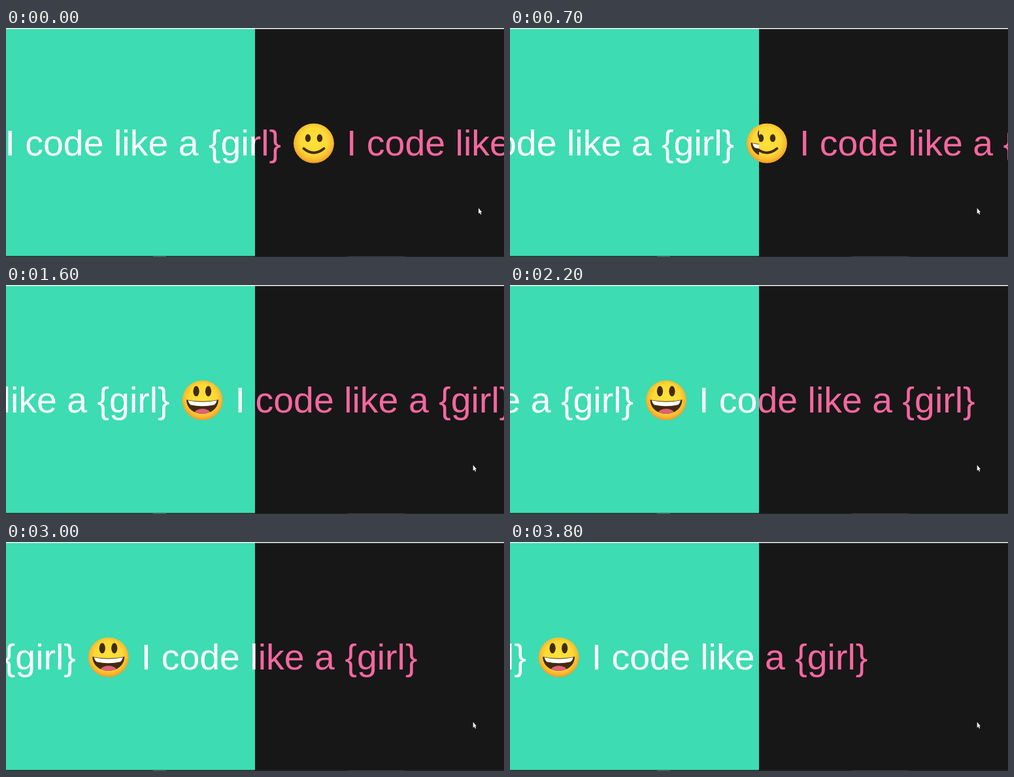
Animation, 762 px wide and 352 px high, one loop 3.9 s. Source, as an HTML page with a canvas:

```html
<!DOCTYPE html>
<html lang="en">
<head>
<meta charset="utf-8">
<title>I code like a {girl}</title>
<style>
  html, body { margin: 0; width: 100%; height: 100%; overflow: hidden; background: #171717; }
  canvas { display: block; }
</style>
</head>
<body>
<canvas id="stage" width="762" height="352"></canvas>
<script>
const ctx = document.getElementById('stage').getContext('2d');
const W = 762, H = 352, SPLIT = 381, LOOP = 3900, STEP = 100;
const BASELINE = 196, EMOJI_OFFSET = 472.6, PERIOD = 522.6;
const PHRASE = 'I code like a {girl}';
const BROWN = '#422b0d';

function rect(color, x, y, w, h) {
  ctx.fillStyle = color;
  ctx.fillRect(x, y, w, h);
}

function ellipse(color, x, y, rx, ry) {
  ctx.fillStyle = color;
  ctx.beginPath();
  ctx.ellipse(x, y, rx, ry, 0, 0, Math.PI * 2);
  ctx.fill();
}

function face() {
  const skin = ctx.createRadialGradient(0, -4, 0, 0, -3, 34);
  skin.addColorStop(0, '#fde238');
  skin.addColorStop(0.62, '#fcd936');
  skin.addColorStop(0.85, '#f8b92f');
  skin.addColorStop(1, '#ee9428');
  ellipse(skin, 0, 0, 31, 30.5);
}

function grin() {
  face();
  for (const x of [-9.5, 9]) ellipse(BROWN, x, -14, 4.6, 8);
  ctx.save();
  const mouth = new Path2D('M-24.5 -1 Q0 4 24.5 -1 C24 13 13 20.5 0 20.5 C-13 20.5 -24 13 -24.5 -1Z');
  ctx.fillStyle = BROWN;
  ctx.fill(mouth);
  ctx.clip(mouth);
  ellipse('#e0607c', 0, 20, 12, 7);
  ctx.fillStyle = '#fff';
  ctx.fill(new Path2D('M-22 0 Q0 5 22 0 Q21 5 18 7 Q0 11 -18 7 Q-21 5 -22 0Z'));
  ctx.restore();
}

function smile() {
  face();
  for (const x of [-9, 9]) ellipse(BROWN, x, -8, 4.2, 6);
  ctx.strokeStyle = BROWN;
  ctx.lineWidth = 4;
  ctx.lineCap = 'round';
  ctx.stroke(new Path2D('M-15.5 8 Q0 21 15.5 8'));
}

function panel(left, bg, ink, emoji, x) {
  ctx.save();
  ctx.beginPath();
  ctx.rect(left, 0, SPLIT, H);
  ctx.clip();
  rect(bg, left, 0, SPLIT, H);
  ctx.fillStyle = ink;
  ctx.fillText(PHRASE, x, BASELINE);
  ctx.fillText(PHRASE, x + PERIOD, BASELINE);
  ctx.translate(x + EMOJI_OFFSET, 177.3);
  emoji();
  ctx.restore();
}

function cursor(x, y) {
  ctx.save();
  ctx.translate(x, y);
  ctx.fillStyle = '#f4f4f4';
  ctx.fill(new Path2D('M0 0 V8.6 L1.8 7 L3.2 10 L4.5 9.4 L3.2 6.4 H5.4Z'));
  ctx.restore();
}

// The scroll runs slightly faster during the first 700 ms.
const scrollX = t => t < 700 ? -1.6 - 78 * t / 700 : -79.6 - 0.1027 * (t - 700);

function draw(t) {
  ctx.font = '55.5px "Liberation Sans", Arial, sans-serif';
  const x = scrollX(t);
  panel(0, '#3ddcb2', '#fff', grin, x);
  panel(SPLIT, '#171717', '#f5679f', smile, x);
  rect('#f3f5f4', 0, 0, W, 1.5);
  rect('#202224', 0, 350.5, W, 1.5);
  rect('#55595a', 225, 351, 20, 1);
  rect('#3a3d3e', 523, 351, 87, 1);
  cursor(723 - 8.3 * Math.min(1, t / 500), 276.8);
}

function tick(now) {
  draw(Math.floor(now % LOOP / STEP) * STEP);
  requestAnimationFrame(tick);
}
requestAnimationFrame(tick);
</script>
</body>
</html>
```
